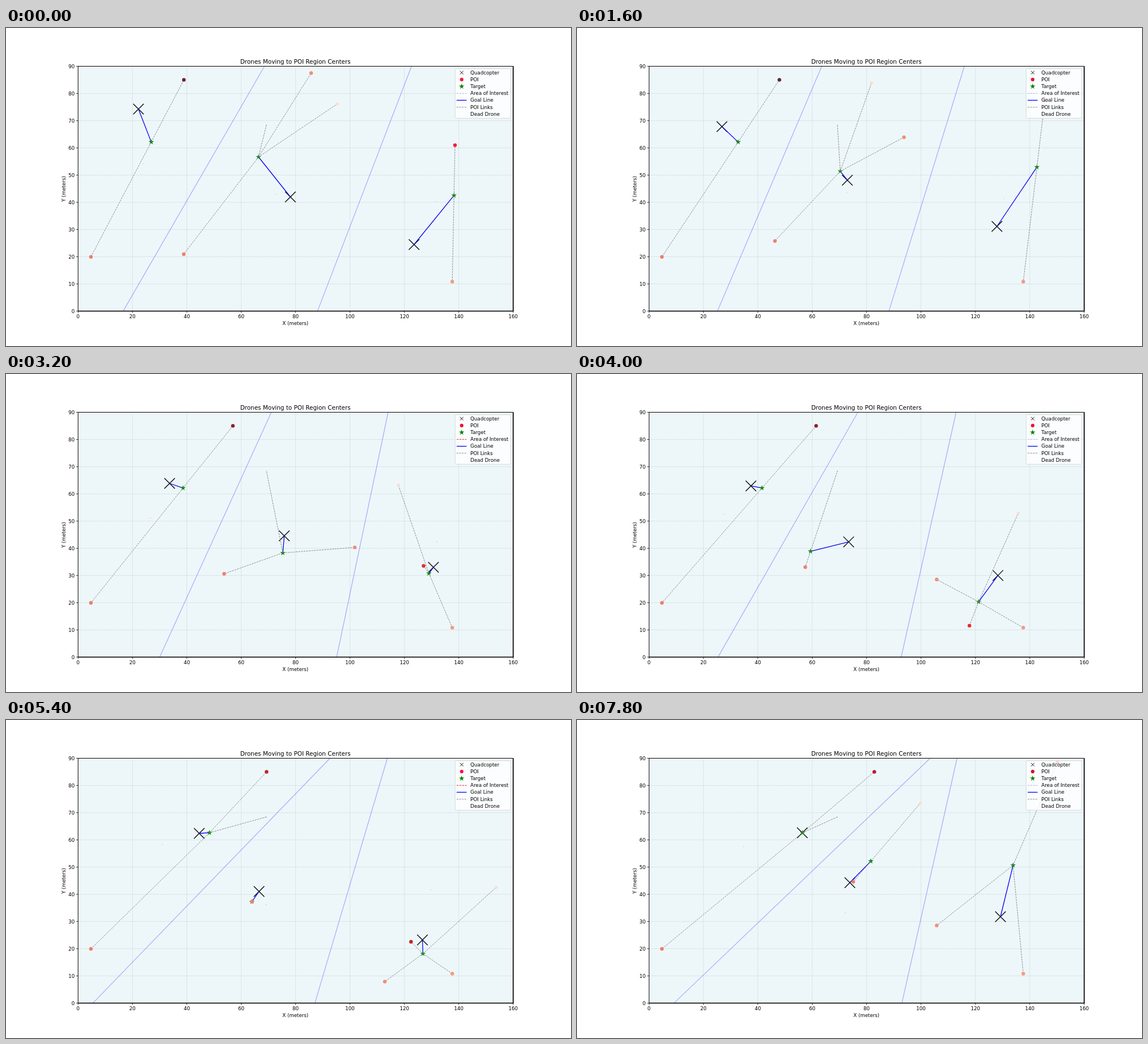
Animation of 998x561 px, one loop 8 s. Source, as an HTML page with a canvas:

```html
<!DOCTYPE html>
<html lang="en">
<head>
<meta charset="utf-8">
<title>Drones Moving to POI Region Centers</title>
<style>
html, body { margin: 0; width: 100%; height: 100%; overflow: hidden; background: #fff; }
canvas { display: block; width: 998px; height: 561px; }
</style>
</head>
<body>
<canvas id="stage" width="998" height="561"></canvas>
<script>
const ctx = document.getElementById('stage').getContext('2d');
const L = 127.3, R = 895.8, T = 67.5, B = 499.4;
const STEP = 200, COUNT = 40, SPEED = 4.8;
const FONT = '"DejaVu Sans", Verdana, sans-serif';
const REGION = 'rgba(0,0,255,0.3)', LINK = '#808080';

// Points of interest: start, velocity per step, weight, optional bounce [length, phase]
const pois = [
  { x: 150, y: 403.8, vx: 0, vy: 0, w: 0.85, color: '#f07d69' },
  { x: 314.2, y: 91.4, vx: 5.41, vy: 0, w: 1.57,
    tones: ['#721f29', '#5a282f', '#8b2224', '#7d1f2f', '#c42222', '#c8122f', '#c2122f'] },
  { x: 314, y: 399, vx: 4.46, vy: -2.91, w: 1, color: '#f07f6c' },
  { x: 460, y: 171, vx: 0, vy: 0, w: 0.197, color: 'rgba(235,120,95,0.75)', r: 0.7 },
  { x: 788.3, y: 447.5, vx: 0, vy: 0, w: 0.76, color: '#f29b80' },
  { x: 671, y: 496.6, vx: 11.1, vy: -26.35, w: 1.305, bounce: [16, 11],
    tones: ['#f91d38', '#e6193a', '#e92a31', '#e0163c', '#c12626', '#e23a38', '#e23a38'] },
  { x: 539, y: 79.5, vx: 4.82, vy: 14.15, w: 0.86, bounce: [29, 0], color: '#f08f78' },
  { x: 477, y: 72.1, vx: 21.6, vy: 12.4, w: 0.355, bounce: [19, 34], color: '#f9dfd2', r: 2.8 }
];

// Drone waypoints at chosen steps: x, y for each of the three drones
const marks = [0, 8, 16, 23, 27, 34, 39];
const ways = [
  [234, 143, 502.3, 298, 720.8, 382],
  [256, 174, 477.5, 268.5, 741.8, 350],
  [289, 193, 491.5, 285.5, 755, 341],
  [321.3, 199, 464, 298, 737, 368.3],
  [341.3, 200, 447, 302.5, 735.6, 388],
  [374.6, 199, 463.5, 301, 745, 371],
  [398, 199, 482, 287, 748, 347]
];
const legendTones = ['#fb1838', '#e6142f', '#f0142f', '#ff1a3a', '#ff104a', '#d0103a', '#d21032'];

function poiAt(p, n) {
  let s = n;
  if (p.bounce) {
    const [len, phase] = p.bounce;
    const m = (n + phase) % (2 * len + 2);
    s = m <= len ? m : 2 * len + 1 - m;
  }
  return { x: p.x + p.vx * s, y: p.y + p.vy * s };
}

// Give each point to its nearest drone; a target is the weighted centre of its points
function assign(drones, n) {
  const groups = drones.map(() => ({ x: 0, y: 0, w: 0, links: [] }));
  for (const p of pois) {
    const at = poiAt(p, n);
    const dist = drones.map(d => Math.hypot(d.x - at.x, d.y - at.y));
    const g = groups[dist.indexOf(Math.min(...dist))];
    g.x += at.x * p.w;
    g.y += at.y * p.w;
    g.w += p.w;
    g.links.push(at);
  }
  return groups.map((g, i) => g.w
    ? { x: g.x / g.w, y: g.y / g.w, links: g.links }
    : { x: drones[i].x, y: drones[i].y, links: [] });
}

function chase(d, t) {
  const dist = Math.hypot(t.x - d.x, t.y - d.y);
  const k = dist ? Math.min(SPEED, dist) / dist : 0;
  return { x: d.x + (t.x - d.x) * k, y: d.y + (t.y - d.y) * k };
}

const toDrones = a => [0, 2, 4].map(i => ({ x: a[i], y: a[i + 1] }));

// Chase the targets between waypoints, easing the remainder out along the way
function flight() {
  const path = [];
  for (let k = 0; k + 1 < marks.length; k++) {
    const len = marks[k + 1] - marks[k];
    const run = [toDrones(ways[k])];
    for (let j = 0; j < len; j++) {
      const goals = assign(run[j], marks[k] + j);
      run.push(run[j].map((d, i) => chase(d, goals[i])));
    }
    const end = toDrones(ways[k + 1]);
    run.forEach((ds, j) => {
      path[marks[k] + j] = ds.map((d, i) => ({
        x: d.x + (end[i].x - run[len][i].x) * j / len,
        y: d.y + (end[i].y - run[len][i].y) * j / len
      }));
    });
  }
  return path;
}
const path = flight();

function line(x1, y1, x2, y2, color, width, dash = []) {
  ctx.strokeStyle = color;
  ctx.lineWidth = width;
  ctx.setLineDash(dash);
  ctx.beginPath();
  ctx.moveTo(x1, y1);
  ctx.lineTo(x2, y2);
  ctx.stroke();
  ctx.setLineDash([]);
}

function dot(x, y, r, color) {
  ctx.fillStyle = color;
  ctx.beginPath();
  ctx.arc(x, y, r, 0, Math.PI * 2);
  ctx.fill();
}

function cross(x, y, r, width) {
  line(x - r, y - r, x + r, y + r, '#000', width);
  line(x - r, y + r, x + r, y - r, '#000', width);
}

function star(x, y, r) {
  ctx.fillStyle = '#008000';
  ctx.beginPath();
  for (let i = 0; i < 10; i++) {
    const a = i * Math.PI / 5 - Math.PI / 2, q = i % 2 ? r * 0.382 : r;
    ctx.lineTo(x + q * Math.cos(a), y + q * Math.sin(a));
  }
  ctx.fill();
}

function text(s, x, y, align = 'center', size = 8.67) {
  ctx.font = size + 'px ' + FONT;
  ctx.textAlign = align;
  ctx.fillStyle = '#000';
  ctx.fillText(s, x, y);
}

// x of the border between two drones at height y
const border = (a, b, y) =>
  (a.x + b.x) / 2 - (y - (a.y + b.y) / 2) * (b.y - a.y) / (b.x - a.x);

function centroid(left, right) {
  const clamp = x => Math.max(L, Math.min(R, x));
  let area = 0, sx = 0, sy = 0;
  for (let y = T + 2; y < B; y += 4) {
    const a = clamp(left(y)), b = clamp(right(y)), w = Math.max(0, b - a);
    area += w;
    sx += w * (a + b) / 2;
    sy += w * y;
  }
  return { x: sx / area, y: sy / area };
}

function axes() {
  for (let v = 0; v <= 160; v += 20) {
    const x = L + (R - L) * v / 160;
    if (v % 160) line(x, B, x, T, 'rgba(140,150,155,0.5)', 0.6, [1.6, 0.9]);
    line(x, B, x, B + 3.2, '#000', 0.8);
    text(v, x, 512.3);
  }
  for (let v = 0; v <= 90; v += 10) {
    const y = B - (B - T) * v / 90;
    if (v % 90) line(L, y, R, y, 'rgba(140,150,155,0.5)', 0.6, [1.6, 0.9]);
    line(L - 3.2, y, L, y, '#000', 0.8);
    text(v, 121.2, y + 3.3, 'right');
  }
  text('Drones Moving to POI Region Centers', 511.2, 62.6, 'center', 10.42);
  text('X (meters)', 511.2, 523.6);
  ctx.save();
  ctx.translate(104.6, 283.8);
  ctx.rotate(-Math.PI / 2);
  text('Y (meters)', 0, 0);
  ctx.restore();
}

function frame() {
  ctx.strokeStyle = '#000';
  ctx.lineWidth = 1;
  ctx.strokeRect(L, T, R - L, B - T);
  line(L, B, R + 0.6, B, '#000', 1.5);
  line(R, T, R, B + 0.6, '#000', 1.5);
}

function legend(n, tone) {
  ctx.fillStyle = 'rgba(255,255,255,0.8)';
  ctx.strokeStyle = 'rgba(204,204,204,0.8)';
  ctx.lineWidth = 0.9;
  ctx.beginPath();
  ctx.roundRect(793.3, 71.8, 98.2, 87.4, 2);
  ctx.fill();
  ctx.stroke();
  const rowY = i => 78.7 + i * 12.2;
  const labels = ['Quadcopter', 'POI', 'Target', 'Area of Interest',
    'Goal Line', 'POI Links', 'Dead Drone'];
  labels.forEach((s, i) => text(s, 820.3, rowY(i) + 2.9, 'left'));
  const sample = (i, color, width, dash) =>
    line(796, rowY(i), 813.6, rowY(i), color, width, dash);
  cross(804.9, rowY(0), 3, 0.9);
  dot(804.9, rowY(1), 3.1, tone);
  star(804.9, rowY(2), 5);
  if (n % 11 === 5) sample(3, '#e8244c', 1, [3.4, 1.5]);
  else sample(3, 'rgba(0,0,255,0.35)', 0.9, [3.4, 1.5]);
  sample(4, '#0000ff', 1.3);
  sample(5, LINK, 0.9, [3.2, 1.4]);
}

function draw(n) {
  const drones = path[n], goals = assign(drones, n);
  const mark = marks.filter(m => m <= n).length - 1;
  const [a, b, c] = drones;

  ctx.fillStyle = '#fff';
  ctx.fillRect(0, 0, 998, 561);
  ctx.fillStyle = '#edf7fa';
  ctx.fillRect(L, T, R - L, B - T);
  axes();

  ctx.save();
  ctx.beginPath();
  ctx.rect(L, T, R - L, B - T);
  ctx.clip();
  const ab = y => border(a, b, y), bc = y => border(b, c, y);
  for (const edge of [ab, bc]) line(edge(T), T, edge(B), B, REGION, 1.25);
  const edges = [() => L, ab, bc, () => R];
  for (let i = 0; i < 3; i++) {
    const m = centroid(edges[i], edges[i + 1]);
    dot(m.x, m.y, 0.7, 'rgba(225,130,110,0.65)');
  }
  drones.forEach(d => cross(d.x, d.y, 9.3, 1.3));
  drones.forEach((d, i) => line(d.x, d.y, goals[i].x, goals[i].y, '#0000ee', 1.3));
  goals.forEach(g => star(g.x, g.y, 5));
  for (const g of goals)
    for (const p of g.links) line(g.x, g.y, p.x, p.y, LINK, 0.9, [3.2, 1.4]);
  for (const p of pois) {
    const at = poiAt(p, n);
    dot(at.x, at.y, p.r || 3.2, p.tones ? p.tones[mark] : p.color);
  }
  ctx.restore();

  frame();
  legend(n, legendTones[mark]);
}

let start, shown = -1;
function tick(now) {
  if (start === undefined) start = now;
  const n = Math.floor(Math.max(0, now - start) / STEP) % COUNT;
  if (n !== shown) draw(shown = n);
  requestAnimationFrame(tick);
}
draw(0);
requestAnimationFrame(tick);
</script>
</body>
</html>
```
